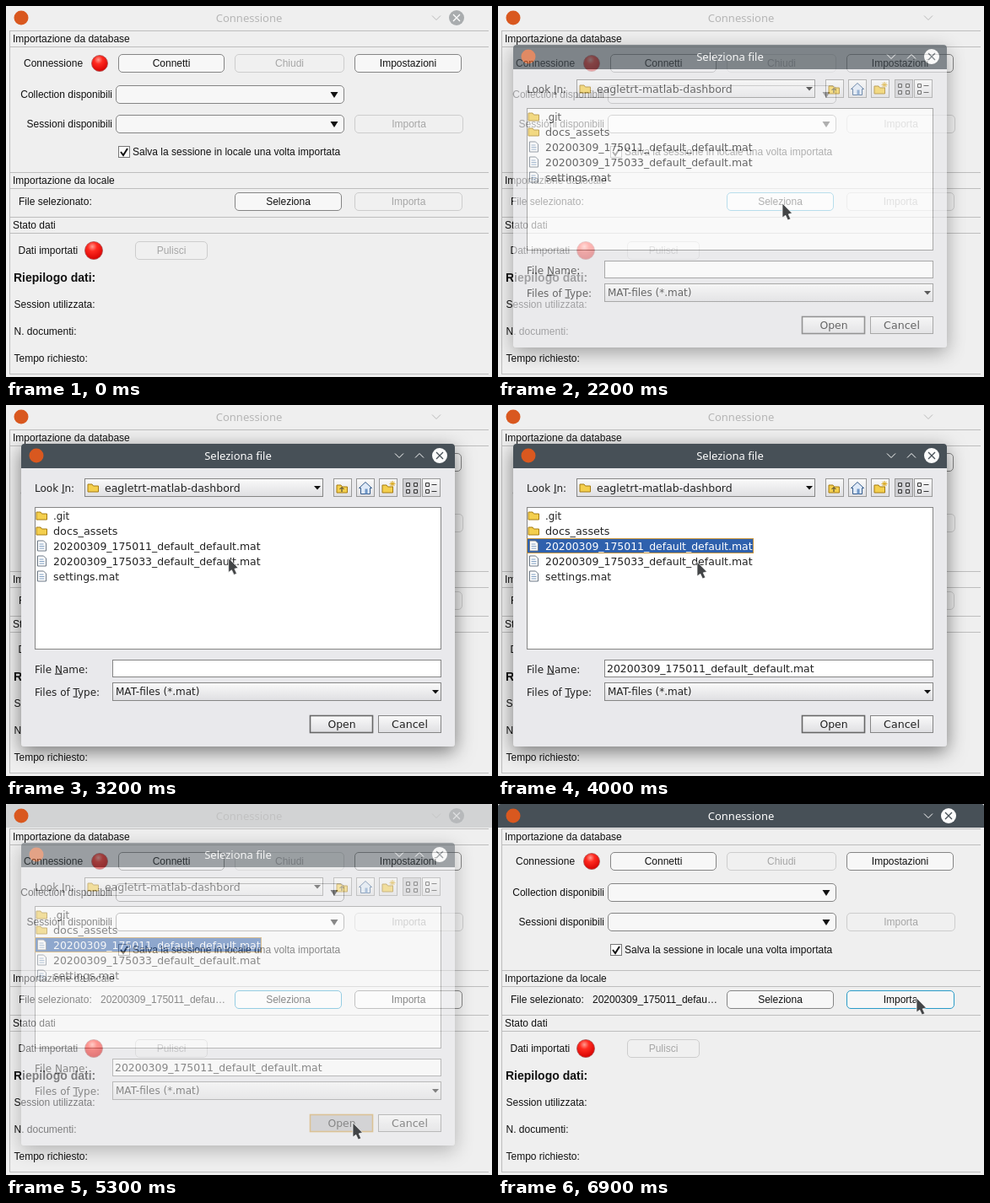
An HTML page that plays this animation: 576 by 440 pixels, repeating every 7 s.

```html
<!DOCTYPE html>
<html lang="it">
<head>
<meta charset="utf-8">
<title>Connessione</title>
<style>
  html, body { margin: 0; width: 100%; height: 100%; overflow: hidden; background: #efefef; }
  svg { display: block; width: 576px; height: 440px; }
  text { white-space: pre; }
  .ui { font: 12px "Liberation Sans", Arial, sans-serif; }
  .bold { font: bold 14px "Liberation Sans", Arial, sans-serif; }
  .java { font-family: "DejaVu Sans", sans-serif; }
  .title { font: 13px "Noto Sans", sans-serif; }
  .u { text-decoration: underline; }
</style>
</head>
<body>
<svg id="stage" viewBox="0 0 576 440" xmlns="http://www.w3.org/2000/svg"></svg>
<script>
const LOOP = 7000, STEP = 100;
const FILE = '20200309_175011_default_default.mat';
const BLUE = '#2a9cc8', BORDER = '#858585', DARK = '#475057';

// Markup helpers; box() takes edges, text() takes the vertical centre.
const box = (x1, y1, x2, y2, fill, stroke = 'none', extra = '') =>
  `<rect x="${x1 + .5}" y="${y1 + .5}" width="${x2 - x1 - 1}" height="${y2 - y1 - 1}" fill="${fill}" stroke="${stroke}" ${extra}/>`;
const path = (d, stroke, fill = 'none', extra = '') =>
  `<path d="${d}" stroke="${stroke}" fill="${fill}" ${extra}/>`;
const circle = (x, y, r, fill, extra = '') => `<circle cx="${x}" cy="${y}" r="${r}" fill="${fill}" ${extra}/>`;
const text = (x, y, s, cls = 'ui', fill = '#111', extra = '') =>
  `<text x="${x}" y="${y + 4}" class="${cls}" fill="${fill}" ${extra}>${s}</text>`;
const java = (x, y, s, size = 12, extra = '') => text(x, y + .5, s, 'java', '#222', `font-size="${size}" ${extra}`);
const mid = 'text-anchor="middle"';

const button = (x1, y, x2, label, enabled = true, id = '') => `<g id="${id}">` +
  box(x1, y - 11, x2, y + 11, enabled ? '#f7f7f7' : '#f0f0f0', enabled ? BORDER : '#cdcdcd', 'rx="4.5"') +
  text((x1 + x2) / 2, y, label, 'ui', enabled ? '#111' : '#a6a6a6', mid) + '</g>';
const dropdown = y => box(130, y - 11, 401, y + 11, '#f7f7f7', BORDER, 'rx="4.5"') +
  path(`M384.5 ${y - 3}h9l-4.5 7z`, 'none', '#111');
const lamp = (x, y, r) => circle(x, y, r, 'url(#red)', 'stroke="#a55" stroke-width=".8"');
const chevron = (x, y, dir, stroke) => path(`M${x - 5} ${y - 2.5 * dir}l5 ${5 * dir}l5 ${-5 * dir}`, stroke);
const closeButton = (x, y, fill, stroke) => circle(x, y, 9, fill) +
  path(`M${x - 4} ${y - 4}l8 8m0 -8l-8 8`, stroke, 'none', 'stroke-width="1.3"');

function mainWindow() {
  const rules = [29, 48, 197, 216, 250, 269, 436].map(y => `M4 ${y + .5}H572`).join('');
  return `<rect width="576" height="440" fill="#efefef"/>` +
    text(288, 14.5, 'Connessione', 'title', '#b6b6b6', mid) + chevron(510, 14, 1, '#b9b9b9') +
    `<g id="closeIdle">${closeButton(534, 14, '#a9acae', '#fff')}</g>` +
    `<g id="activeBar">${path('M0 28V3Q0 0 3 0H573Q576 0 576 3V28z', 'none', DARK)}` +
    text(288, 14.5, 'Connessione', 'title', '#fcfcfc', mid) + chevron(510, 14, 1, '#fcfcfc') +
    closeButton(534, 14, '#fcfcfc', DARK) + '</g>' +
    circle(18, 14, 8.5, '#d9581f') +
    path(rules + 'M4.5 29V437', '#bdbdbd') +

    text(8, 39, 'Importazione da database') +
    text(21, 68, 'Connessione') + lamp(111, 68, 9.5) +
    button(133, 68, 259, 'Connetti') + button(271, 68, 401, 'Chiudi', false) + button(413, 68, 540, 'Impostazioni') +
    text(126, 105, 'Collection disponibili', 'ui', '#111', 'text-anchor="end"') + dropdown(105) +
    text(126, 140, 'Sessioni disponibili', 'ui', '#111', 'text-anchor="end"') + dropdown(140) +
    button(413, 140, 542, 'Importa', false) +
    box(133, 166, 147, 180, '#fafafa', '#777') +
    path('M136 173l3 4l5 -8', '#111', 'none', 'stroke-width="2"') +
    text(150, 173, 'Salva la sessione in locale una volta importata') +

    text(8, 207, 'Importazione da locale') +
    text(15, 232, 'File selezionato:') +
    `<g id="chosen">${text(112, 232, '20200309_175011_defau…')}</g>` +
    button(271, 232, 398, 'Seleziona', true, 'select') +
    button(413, 232, 541, 'Importa', false, 'importOff') + button(413, 232, 541, 'Importa', true, 'importOn') +

    text(8, 260, 'Stato dati') +
    text(14.5, 290, 'Dati importati') + lamp(104, 290, 10.5) + button(153, 290, 239, 'Pulisci', false) +
    text(9, 322.5, 'Riepilogo dati:', 'bold') +
    text(9.5, 354, 'Session utilizzata:') + text(9.5, 386, 'N. documenti:') + text(9.5, 418, 'Tempo richiesto:');
}

const folder = (x, y) => path(`M${x} ${y - 4}h5l1.5 2h6v7h-12.5z`, '#a67c13', '#f4cf4d');
const sheet = (x, y) => path(`M${x} ${y - 6}h7l3 3v9h-10z`, '#6b7785', '#fff') +
  path(`M${x + 2} ${y - 2}h5m-5 2.5h6m-6 2.5h6`, '#7d9cc0');
const combo = (x, y) => box(x, y - 11, x === 93 ? 376 : 516, y + 11, 'url(#face)', '#858585');
const arrow = (x, y) => path(`M${x - 4} ${y - 2}h8l-4 4.5z`, 'none', '#111');
const tool = (x, fill = 'url(#face)') => box(x, 87, x + 22, 109, fill, '#999');

function dialog() {
  const names = ['.git', 'docs_assets', FILE, '20200309_175033_default_default.mat', 'settings.mat'];
  const rows = names.map((name, i) => {
    const y = 131 + 18 * i;
    return (i < 2 ? folder(36, y) : sheet(37.5, y)) +
      java(56, y, name, [11.8, 12.75][i] || 12.45, i === 2 ? 'id="pickedText"' : '');
  });
  const grid = [0, 9].flatMap(dx => [0, 8].map(dy => `M${474.5 + dx} ${92.5 + dy}h4v4h-4z`)).join('');
  return '<rect x="18" y="46" width="514" height="359" rx="4" fill="#e9e9ec" filter="url(#shadow)"/>' +
    path('M18 75V50Q18 46 22 46H528Q532 46 532 50V75z', 'none', DARK) +
    circle(36, 60, 8.5, '#d9581f') + text(275, 60.5, 'Seleziona file', 'title', '#fcfcfc', mid) +
    chevron(466, 60, 1, '#fcfcfc') + chevron(490, 60, -1, '#fcfcfc') + closeButton(514, 60, '#fcfcfc', DARK) +

    java(34, 98, 'Look <tspan class="u">I</tspan>n:') + combo(93, 98) + folder(97, 98) +
    java(117, 98, 'eagletrt-matlab-dashbord', 12.5) + arrow(369, 98) +
    tool(388) + folder(392, 99) + path('M398 103v-5m-2.5 2l2.5 -2.5l2.5 2.5', '#333') +
    tool(415) + path('M418.500 98.5l7.500 -7l7.500 7h-2v7h-11v-7z', '#345b8c', '#dfeaf8') + box(425, 99, 429, 106, '#6e95c6') +
    tool(442) + folder(446, 99) + path('M458 90v7m-3.500 -3.500h7m-6 -2.500l5 5m0 -5l-5 5', '#d9a514') +
    tool(470, '#cfcfd3') + path(grid, '#333') +
    tool(493) + path('M497.500 92.5h4v4h-4zm0 8h4v4h-4zm7 2h6m-6 -8h6', '#333') +

    box(34, 121, 516, 290, '#fff', '#858585') +
    `<g id="highlight">${box(34, 158, 303, 176, '#2f61ad', '#c8963f')}</g>` + rows.join('') +

    java(34, 313, 'File <tspan class="u">N</tspan>ame:') + box(126, 302, 516, 323, '#fff', '#858585') +
    `<g id="fileName">${java(129, 312, FILE, 12.45)}</g>` +
    `<g id="caret">${path('M129.500 305v15', '#111')}</g>` +
    java(34, 340, 'Files of <tspan class="u">T</tspan>ype:') + combo(126, 340) +
    java(130, 339, 'MAT-files (*.mat)') + arrow(509, 340) +
    `<g id="open">${box(360, 368, 435, 389, 'url(#face)', '#666', 'stroke-width="1.6"')}</g>` +
    java(398, 378, 'Open', 12.4, mid) +
    box(441, 368, 516, 389, 'url(#face)', '#858585') + java(478.5, 378, 'Cancel', 12.65, mid);
}

document.getElementById('stage').innerHTML = `<defs>
  <radialGradient id="red" cx=".42" cy=".28" r=".75">
    <stop offset="0" stop-color="#ff9a90"/><stop offset=".35" stop-color="#ff2a20"/><stop offset="1" stop-color="#d40000"/>
  </radialGradient>
  <linearGradient id="face" x2="0" y2="1"><stop stop-color="#fafafa"/><stop offset="1" stop-color="#dfdfe2"/></linearGradient>
  <filter id="shadow" x="-20%" y="-20%" width="140%" height="140%">
    <feDropShadow dx="0" dy="6" stdDeviation="11" flood-opacity=".5"/>
  </filter></defs>` +
  mainWindow() + `<g id="dialog">${dialog()}</g>` +
  `<g id="cursor">${path('M0 0V17L3.800 14.300L6.500 20L9.800 18.500L7.200 12.900L11.500 11.800z', '#fff', '#434547', 'stroke-width=".7"')}</g>`;

const $ = id => document.getElementById(id);
const show = (id, on) => $(id).setAttribute('visibility', on ? 'inherit' : 'hidden');
const clamp = v => Math.min(1, Math.max(0, v));

// Pointer stops: time, x, y; eased between stops.
const stops = [
  [700, 400, 4], [1300, 337, 234], [2800, 337, 234], [3400, 238, 163], [3700, 238, 163],
  [4000, 236, 186], [4300, 411, 378], [5300, 411, 378], [5700, 479, 271],
  [6200, 494, 233], [6700, 496, 230], [LOOP, 496, 230]
];
function pointer(t) {
  const i = Math.max(1, stops.findIndex(s => s[0] >= t));
  const [a, b] = [stops[i - 1], stops[i]];
  const k = clamp((t - a[0]) / (b[0] - a[0])), e = k * k * (3 - 2 * k);
  return [a[1] + (b[1] - a[1]) * e, a[2] + (b[2] - a[2]) * e];
}

function draw(t) {
  const opacity = clamp(t < 4000 ? (t - 2000) / 300 : (5450 - t) / 300);
  const picked = t >= 3600, loaded = t >= 5200, pressed = t >= 5000;

  $('dialog').setAttribute('opacity', opacity);
  show('dialog', opacity > 0);
  show('highlight', picked);
  $('pickedText').setAttribute('fill', picked ? '#fff' : '#222');
  show('fileName', picked);
  show('caret', opacity > 0 && !picked && Math.floor((t - 2300) / 500) % 2 === 0);
  const open = $('open').firstChild;
  open.setAttribute('fill', pressed ? '#b9b9bd' : 'url(#face)');
  open.setAttribute('stroke', pressed ? '#c8963f' : '#666');

  $('activeBar').setAttribute('opacity', clamp((t - 5250) / 300));
  show('closeIdle', t < 2100 || loaded);
  show('chosen', loaded);
  show('importOff', !loaded);
  show('importOn', loaded);
  $('select').firstChild.setAttribute('stroke', t >= 2000 && t < 6500 ? BLUE : BORDER);
  $('importOn').firstChild.setAttribute('stroke', t >= 6500 ? BLUE : BORDER);

  show('cursor', t >= 800);
  $('cursor').setAttribute('transform', `translate(${pointer(t)})`);
}

function tick() {
  draw(Math.floor(performance.now() % LOOP / STEP) * STEP);
  requestAnimationFrame(tick);
}
tick();
</script>
</body>
</html>
```
